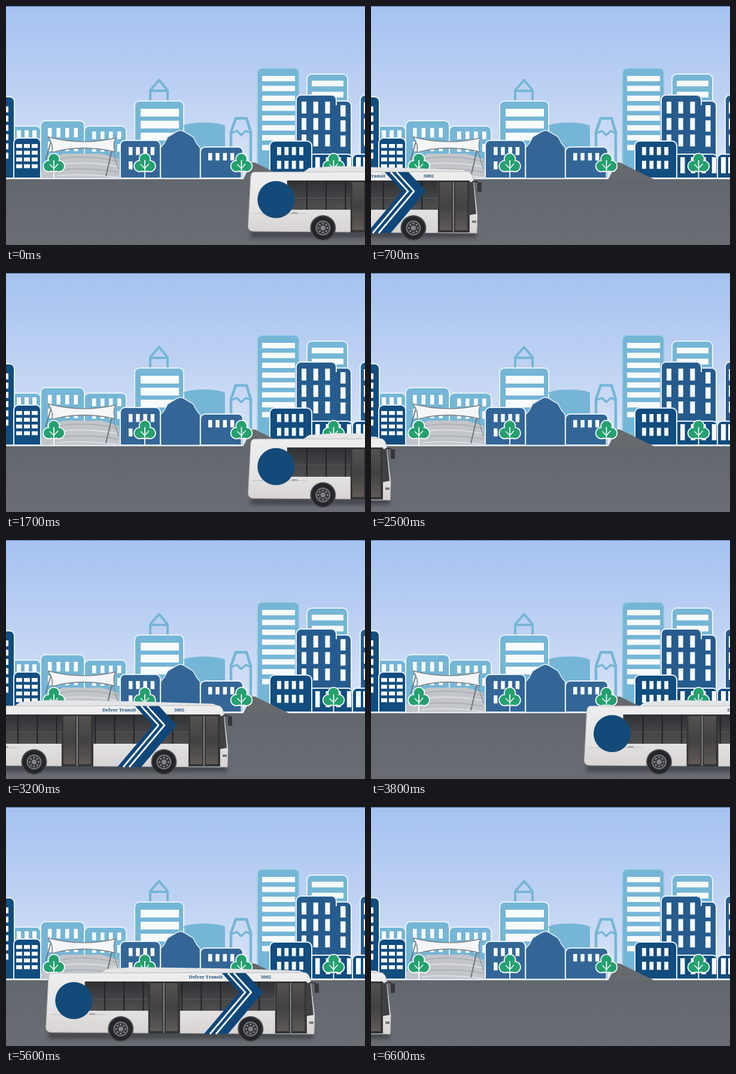
An HTML page with a canvas that plays this animation: 600x400 px, repeating every 6700 ms.

```html
<!DOCTYPE html>
<html lang="en">
<head>
<meta charset="utf-8">
<title>City bus</title>
<style>
html, body { margin: 0; width: 100%; height: 100%; overflow: hidden; background: #666b72; }
canvas { display: block; }
</style>
</head>
<body>
<canvas id="stage" width="600" height="400"></canvas>
<script>
const ctx = document.getElementById('stage').getContext('2d');
const LIGHT = '#75b6d6', NAVY = '#124d7f', BLUE = '#336697', STEEL = '#265c8d';
const GREEN = '#25a06f', WHITE = '#f8fbfd', GROUND = 288;

const series = (start, step, n) => Array.from({ length: n }, (_, i) => start + i * step);

function rect(x, y, w, h, color) {
  ctx.fillStyle = color;
  ctx.fillRect(x, y, w, h);
}

function poly(points, fill) {
  ctx.beginPath();
  points.forEach(p => ctx.lineTo(...p));
  ctx.closePath();
  ctx.fillStyle = fill;
  ctx.fill();
}

function stroke(color, width) {
  ctx.strokeStyle = color;
  ctx.lineWidth = width;
  ctx.stroke();
}

function line(points, color, width) {
  ctx.beginPath();
  points.forEach(p => ctx.lineTo(...p));
  stroke(color, width);
}

function disc(x, y, r, color) {
  ctx.beginPath();
  ctx.arc(x, y, r, 0, Math.PI * 2);
  ctx.fillStyle = color;
  ctx.fill();
}

function shade(y0, y1, ...colors) {
  const g = ctx.createLinearGradient(0, y0, 0, y1);
  colors.forEach((c, i) => g.addColorStop(i / (colors.length - 1), c));
  return g;
}

// A building with rounded top corners and a pale outline.
function block(x0, x1, top, fill, edge = '#e6f2fa') {
  ctx.beginPath();
  ctx.roundRect(x0, top, x1 - x0, GROUND - top, [8, 8, 0, 0]);
  ctx.fillStyle = fill;
  ctx.fill();
  stroke(edge, 2);
}

function panes(xs, ys, w, h) {
  for (const y of ys) for (const x of xs) rect(x, y, w, h, WHITE);
}

function farBuildings() {
  block(2, 58, 201, LIGHT);
  panes(series(18, 13, 3), [208], 7, 12);
  block(58, 131, 192, LIGHT);
  panes(series(70, 14.5, 4), [204, 227], 6.5, 16);
  block(131, 201, 201, LIGHT);
  panes(series(144, 14, 4), [210, 231], 6.5, 13);

  line([[241, 158], [241, 141], [256, 124], [270, 141], [270, 158]], LIGHT, 4);
  line([[241, 142], [270, 142]], LIGHT, 4);
  block(215, 297, 159, LIGHT);
  panes([225], series(172, 20, 3), 64, 13);

  rect(298, 200, 68, 84, LIGHT);
  ctx.beginPath();
  ctx.ellipse(331, 202, 35, 7, 0, Math.PI, 0);
  ctx.fillStyle = LIGHT;
  ctx.fill();

  line([[376, 262], [376, 211], [384, 188], [402, 188], [409, 211], [409, 262]], LIGHT, 4.5);
  line([[376, 213], [386, 209], [393, 216], [401, 209], [409, 213]], LIGHT, 3.5);
  block(420, 490, 104, LIGHT, '#a5d0e6');
  panes([428], series(117, 16.5, 8), 55, 9);
  block(503, 571, 114, LIGHT);
  panes([511], series(125, 18.5, 3), 53, 9.5);
}

function theatre() {
  poly([[57, GROUND], [63, 262], [95, 247], [160, 247], [188, 256], [191, GROUND]], '#c2c5c9');
  for (let i = 0; i < 4; i++) {
    const y = 257 + i * 9;
    ctx.beginPath();
    ctx.moveTo(85, y);
    ctx.quadraticCurveTo(130, y - 10 + i * 2, 188, y + 3);
    stroke(i % 2 ? '#e4e6e8' : '#a8abb0', 1.5);
  }
  line([[76, 224], [66, 258]], '#70757a', 1.8);
  line([[181, 224], [167, 285]], '#70757a', 2);
  line([[176, 235], [188, 273]], '#8a8e92', 1.3);
  ctx.beginPath();
  ctx.moveTo(70, 219);
  ctx.quadraticCurveTo(126, 234, 183, 221);
  ctx.quadraticCurveTo(178, 231, 182, 244);
  ctx.quadraticCurveTo(126, 231, 77, 245);
  ctx.quadraticCurveTo(80, 232, 70, 219);
  ctx.fillStyle = '#f5f6f7';
  ctx.fill();
  stroke('#777c82', 1.3);
}

function nearBuildings() {
  block(-12, 14, 152, NAVY);
  panes([-3], series(168, 15.5, 6), 7, 10);
  block(13, 58, 221, NAVY);
  panes(series(17, 13, 3), series(231, 11.3, 4), 10, 6.5);

  block(191, 258, 225, BLUE);
  panes(series(205, 12.2, 4), [236, 260], 6.5, 13.5);
  block(325, 396, 236, BLUE);
  panes(series(338, 12.3, 4), [246], 6.5, 12.5);

  // The domed hall, mirrored about its middle.
  const half = [[33, GROUND], [33, 237], [27, 230], [21, 219], [6, 210]];
  const hall = [...half.map(([d, y]) => [291.5 - d, y]), [291.5, 208],
    ...half.map(([d, y]) => [291.5 + d, y]).reverse()];
  poly(hall, BLUE);
  line(hall, '#dcebf6', 1.5);

  block(545, 577, 159, STEEL);
  block(485, 552, 149, STEEL);
  rect(544, 166, 14, 84, STEEL);
  panes(series(494, 19.7, 3), series(160, 27.5, 3), 8, 20);
  panes([559], series(166, 25.3, 3), 8.5, 19);
  block(592, 625, 149, STEEL);
  panes([598], series(161, 27, 3), 8, 19);
  block(506, 579, 248, NAVY);
  panes(series(517, 17.6, 4), [253], 7.5, 27);
  block(579, 620, 248, NAVY);
  panes([585, 597], [253], 8, 27);
  block(441, 511, 226, NAVY);
  panes(series(453, 12.4, 4), [236, 259], 6.8, 13.5);
}

function tree(x) {
  for (const [grow, color] of [[1.8, WHITE], [0, GREEN]]) {
    disc(x, 256, 8.5 + grow, color);
    for (const dx of [-8.5, 0, 8.5]) disc(x + dx, 268, 8.5 + grow, color);
  }
  line([[x, 258], [x, 290]], WHITE, 1.8);
  line([[x - 7, 265], [x, 272], [x + 7, 264]], WHITE, 1.5);
}

function scene() {
  rect(0, 0, 600, 292, shade(0, 290, '#a5c2f0', '#bdd1f3', '#dce6f7'));
  rect(0, 0, 600, 1, '#456f9c');
  ctx.lineJoin = 'round';
  farBuildings();
  theatre();
  nearBuildings();
  rect(0, 289, 600, 111, shade(289, 400, '#62676e', '#696d73'));
  rect(0, 287.5, 600, 2.5, '#dfe6ee');
  poly([[396, 291], [411, 262], [416, 262], [475, 291]], '#66696d');
  [80, 232, 393.5, 547.5].forEach(tree);
}

function wheel(x) {
  const y = 371.5;
  disc(x, y, 21.5, '#4d4e51');
  disc(x, y, 19.5, '#252629');
  disc(x, y, 12.5, '#77787b');
  disc(x, y, 10.5, '#393a3d');
  for (let a = 0; a < 6; a += Math.PI / 4)
    disc(x + 7.5 * Math.cos(a), y + 7.5 * Math.sin(a), 1.3, '#a0a0a2');
  disc(x, y, 4, '#858588');
}

function door(x) {
  rect(x, 292, 53, 87, '#353537');
  for (const dx of [3, 29])
    rect(x + dx, 295, 20, 80, shade(295, 375, '#545150', '#434142', '#5f5a57'));
  rect(x + 25, 294, 2, 84, '#858586');
}

function label(text, x) {
  ctx.fillStyle = '#174d7b';
  ctx.font = 'bold 7.7px "Noto Serif", "DejaVu Sans", serif';
  ctx.fillText(text, x, 286.5);
}

function chevron() {
  const edge = dx => [[294 + dx, 278], [323 + dx, 310], [264 + dx, 380]];
  poly([...edge(0), ...edge(40).reverse()], '#10477a');
  for (const dx of [10, 20]) line(edge(dx), WHITE, 2.8);
}

function bus(x) {
  ctx.save();
  ctx.translate(x, 0);

  ctx.filter = 'blur(3px)';
  rect(4, 377, 443, 11, 'rgba(35,37,40,.5)');
  ctx.filter = 'none';

  poly([[92, 278], [102, 271], [148, 268], [290, 270], [424, 274], [438, 280]], '#e4e5e6');
  ctx.beginPath();
  ctx.moveTo(10, 278);
  ctx.lineTo(432, 277);
  ctx.quadraticCurveTo(440, 278, 442, 290);
  ctx.lineTo(449, 350);
  ctx.lineTo(448, 380);
  ctx.lineTo(8, 377);
  ctx.quadraticCurveTo(0, 376, 0, 369);
  ctx.lineTo(4, 290);
  ctx.quadraticCurveTo(4, 278, 10, 278);
  ctx.fillStyle = shade(277, 381, '#eeeeee', '#e8e6e6', '#d6d3d2');
  ctx.fill();
  stroke('#b9bbbd', 1);

  rect(65, 292, 318, 49, shade(292, 341, '#303134', '#414144', '#504e4e'));
  rect(65, 321, 318, 1, '#5a585b');
  for (const post of series(97, 32.3, 9)) rect(post, 292, 2, 49, '#222326');
  rect(8, 347, 90, 1, '#c3c2c0');
  rect(73, 345, 9, 3, '#a6a6a6');

  chevron();
  door(171);
  door(383);
  poly([[435, 294], [442, 295], [447, 348], [435, 350]], '#414144');
  rect(440, 359, 7, 4, '#77787a');
  line([[440, 294], [450, 294]], '#35363a', 2);
  rect(449, 295, 7, 16, '#36373b');

  disc(46.5, 324, 31, '#124a79');
  wheel(125);
  wheel(342);
  label('Delver Transit', 239);
  label('3002', 359);
  ctx.restore();
}

// Times in ms. The bus waits with its nose in view, then drives across in even hops.
const LOOP = 6700, STEP = 100, TRIP = 2200, DEPART = 490, DRIVE = 1600;
const REST = -416, HOP = 48.28, HOP_TIME = STEP / 1.4;

function busX(t) {
  // The loop opens part-way through a trip.
  const gone = t < 400 ? t + 1214 : (t - DEPART + TRIP) % TRIP;
  return gone < DRIVE ? REST + HOP * Math.round(gone / HOP_TIME) : REST;
}

const begin = performance.now();
let shown = -1;

function draw(now) {
  const frame = Math.floor((Math.max(0, now - begin) % LOOP) / STEP);
  if (frame !== shown) {
    shown = frame;
    scene();
    bus(busX(frame * STEP));
  }
  requestAnimationFrame(draw);
}

draw(begin);
</script>
</body>
</html>
```
